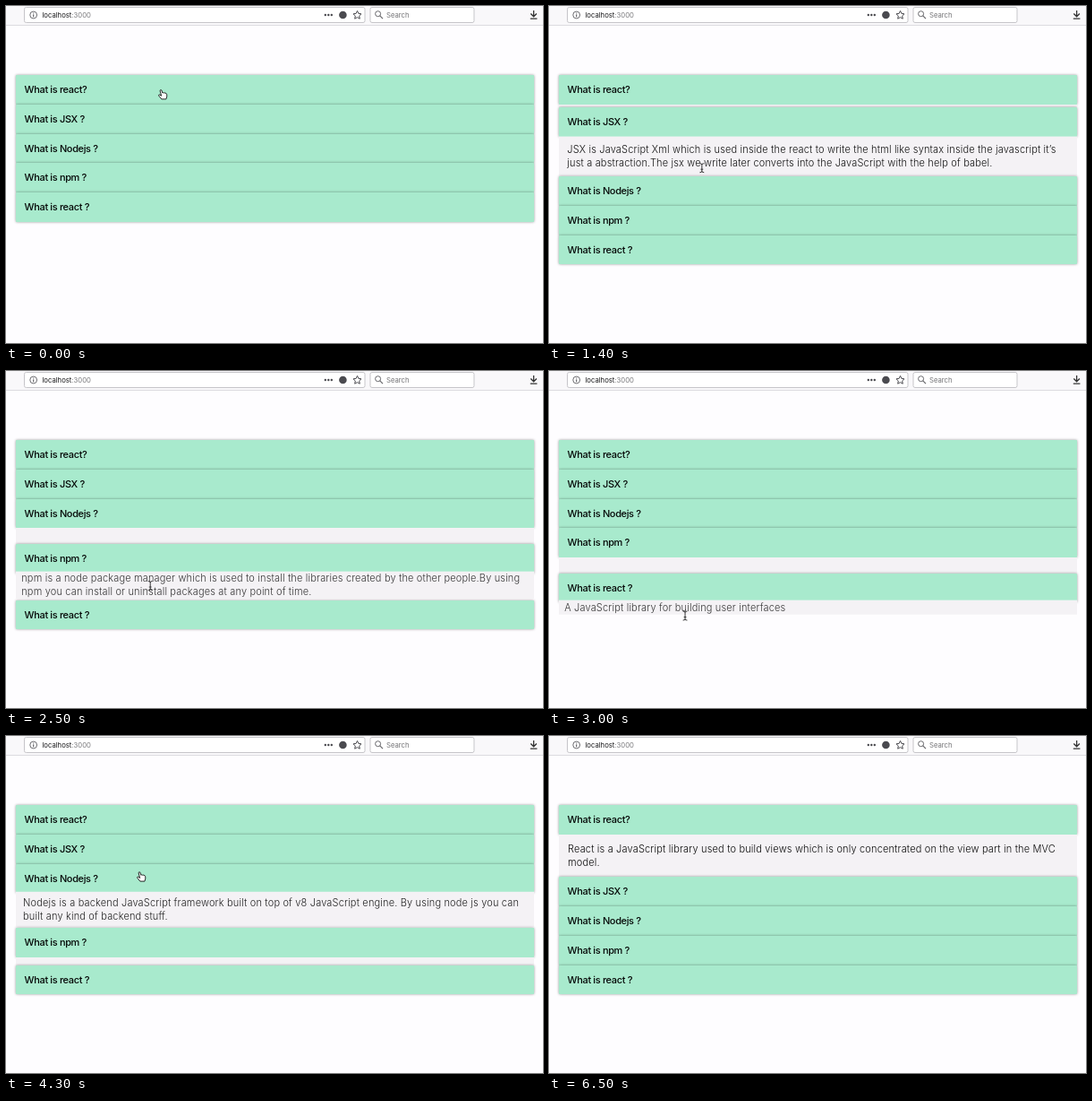
Animation of 600x376 px, one loop 6600 ms. Source, as an HTML page:

```html
<!DOCTYPE html>
<html lang="en">
<head>
<meta charset="utf-8">
<title>Accordion</title>
<style>
html, body { margin: 0; width: 100%; height: 100%; overflow: hidden; }
body { position: relative; background: #fefdff; font-family: Inter, Roboto, sans-serif; }
#bar, #cursor { position: absolute; left: 0; top: 0; display: block; overflow: visible; }
#bar text { font-size: 7.7px; }
#list { position: absolute; left: 11px; top: 77px; width: 579px; }
.head, .panel { position: relative; z-index: 1; }
.head {
  box-sizing: border-box; height: 32.8px; padding-left: 9.6px;
  background: #a8eacd; border-radius: 1px; box-shadow: 0 0 3px rgba(0, 0, 0, .42);
  font-size: 11px; font-weight: 500; line-height: 33.4px; letter-spacing: -.36px;
  color: #050807; white-space: pre;
}
.panel { background: #f4f2f5; overflow: hidden; }
.panel div {
  font-size: 11px; font-weight: 300; line-height: 14.4px; letter-spacing: .16px;
  color: #0c0c0c; white-space: pre;
}
#cursor { z-index: 2; }
</style>
</head>
<body>
<svg id="bar" width="600" height="24" fill="none" stroke="#4a4a4f">
  <rect width="600" height="21.5" fill="#f9f8fa" stroke="none"/>
  <path d="M0 21.5H600" stroke="#dddce0"/>
  <g fill="#fff" stroke="#c6c5c9">
    <rect x="20.5" y="1.5" width="380.5" height="17" rx="2"/>
    <rect x="407" y="1.5" width="116" height="17" rx="2"/>
  </g>
  <circle cx="30.7" cy="10" r="3.9" stroke-width=".8"/>
  <path d="M30.7 9.4V12.3M30.7 7.6V8.5"/>
  <path d="M356.8 10h0M360.3 10h0M363.8 10h0" stroke-width="2.4" stroke-linecap="round"/>
  <circle cx="376.4" cy="10" r="4.3" fill="#4a4a4f" stroke="none"/>
  <path d="M392.5 5.4L393.9 8.4L397 8.8L394.7 11L395.3 14.2L392.5 12.7L389.7 14.2L390.3 11L388 8.8L391.1 8.4Z" stroke-linejoin="round"/>
  <circle cx="415.6" cy="8.7" r="3" stroke="#66666a"/>
  <path d="M417.8 10.9L421 14.1" stroke="#66666a" stroke-width="1.2"/>
  <path d="M589.6 5V11.4M586.3 8.5L589.6 11.8L592.9 8.5M585.8 14.2H593.4" stroke="#333" stroke-width="1.3"/>
  <g stroke="none">
    <text x="40.5" y="12.8" fill="#18181a">localhost<tspan fill="#77777a">:3000</tspan></text>
    <text x="425" y="12.8" fill="#737376">Search</text>
  </g>
</svg>
<div id="list"></div>
<svg id="cursor" width="1" height="1" stroke-linejoin="round" stroke-linecap="round">
  <path id="hand" fill="#fff" stroke="#111" stroke-width=".9" d="M-.8 .6Q0 -.5 .9 .6L1.8 3.6Q2.7 2.9 3.4 3.6Q4.3 3 5 3.9Q6.2 3.6 6.6 5L6.8 7.3L5.9 10.5H.8L-2.3 6.7Q-2.7 5.4 -1.4 5.5L.3 6.6Z"/>
  <path id="arrow" fill="#111" stroke="#fff" stroke-width=".6" d="M0 0V8.6L2 6.9L3.4 10L4.8 9.4L3.5 6.4H6.2Z"/>
  <path id="beam" fill="none" stroke="#222" stroke-width=".9" d="M-2 -5Q0 -5 0 -3.8Q0 -5 2 -5M0 -4V4M-2 5Q0 5 0 3.8Q0 5 2 5M-1 1.5H1"/>
</svg>
<script>
const LOOP = 6600, STEP = 100, FADE = 400;
const TOP = 77, ROW = 32.8, LINE = 14.4, PAD = 9.3;

const items = [
  ['What is react?', 'React is a JavaScript library used to build views which is only concentrated on the view part in the MVC\nmodel.'],
  ['What is JSX ?', 'JSX is JavaScript Xml which is used inside the react to write the html like syntax inside the javascript it’s\njust a abstraction.The jsx we write later converts into the JavaScript with the help of babel.'],
  ['What is Nodejs ?', 'Nodejs is a backend JavaScript framework built on top of v8 JavaScript engine. By using node js you can\nbuilt any kind of backend stuff.'],
  ['What is npm ?', 'npm is a node package manager which is used to install the libraries created by the other people.By using\nnpm you can install or uninstall packages at any point of time.'],
  ['What is react ?', 'A JavaScript library for building user interfaces']
];

const $ = id => document.getElementById(id);
const add = (parent, cls, text = '') => {
  const el = document.createElement('div');
  el.className = cls;
  el.textContent = text;
  return parent.appendChild(el);
};

const panels = items.map(([title, body]) => {
  add($('list'), 'head', title);
  const box = add($('list'), 'panel');
  return { box, text: add(box, '', body), height: body.split('\n').length * LINE };
});

// The rows are clicked one by one down the list, then back up.
const times = [390, 1190, 1890, 2470, 2970, 3780, 4180, 4570, 5270];
const bottom = items.length - 1;
const rowAt = i => bottom - Math.abs(bottom - i);

const clicks = times.map((t, i) => {
  const item = rowAt(i), open = i ? rowAt(i - 1) : bottom;
  const shift = open < item ? panels[open].height + 2 * PAD : 0;
  const x = i <= bottom ? 173 - 1.3 * i * i : 138 + 9 * (i - bottom - 1);
  return { t, item, x, y: TOP + ROW * (item + .5) + shift };
});

// Pointer stops: every click, a dip below the list, and the way out at the top.
const stops = [
  { ...clicks[0], t: 0 }, ...clicks,
  { t: 3200, x: 149, y: 295 }, { t: 5850, x: 190, y: -20 }, { t: LOOP, x: 190, y: -20 }
].sort((a, b) => a.t - b.t);

function pointer(t) {
  const i = stops.findIndex(s => s.t > t);
  const a = stops[i - 1], b = stops[i];
  const u = (t - a.t) / (b.t - a.t), k = u * u * (3 - 2 * u);
  return [a.x + (b.x - a.x) * k, a.y + (b.y - a.y) * k];
}

// cubic-bezier(.25, .1, .25, 1)
function ease(u) {
  if (u >= 1) return 1;
  const curve = (s, a, b) => 3 * s * (1 - s) * ((1 - s) * a + s * b) + s ** 3;
  let lo = 0, hi = 1;
  for (let i = 0; i < 20; i++) {
    const mid = (lo + hi) / 2;
    if (curve(mid, .25, .25) < u) lo = mid; else hi = mid;
  }
  return curve(lo, .1, 1);
}

function draw(t) {
  const [now, before] = clicks.filter(c => c.t <= t).reverse();
  const k = now ? ease((t - now.t) / FADE) : 0;
  const [x, y] = pointer(t);
  let shape = 'arrow', top = TOP;

  panels.forEach(({ box, text, height }, i) => {
    const shown = i === now?.item;
    const grow = shown ? k : 0;
    const pad = PAD * (i === before?.item ? 1 - k : grow);
    const inner = shown ? height : 0;
    box.style.padding = `${pad}px 0 ${pad}px ${6 + 4 * grow}px`;
    box.style.transform = shown ? `translateY(${-2.5 * (1 - k)}px)` : '';
    text.style.display = shown ? 'block' : 'none';
    text.style.opacity = .8 + .2 * k;

    if (y >= top && y < top + ROW) shape = 'hand';
    top += ROW + pad;
    if (y > top && y < top + inner) shape = 'beam';
    top += inner + pad;
  });

  for (const id of ['hand', 'arrow', 'beam']) $(id).style.display = id === shape ? '' : 'none';
  $('cursor').style.transform = `translate(${x}px, ${y}px)`;
}

function tick() {
  const t = performance.now() % LOOP;
  draw(Math.floor(t / STEP) * STEP);
  requestAnimationFrame(tick);
}
tick();
</script>
</body>
</html>
```
